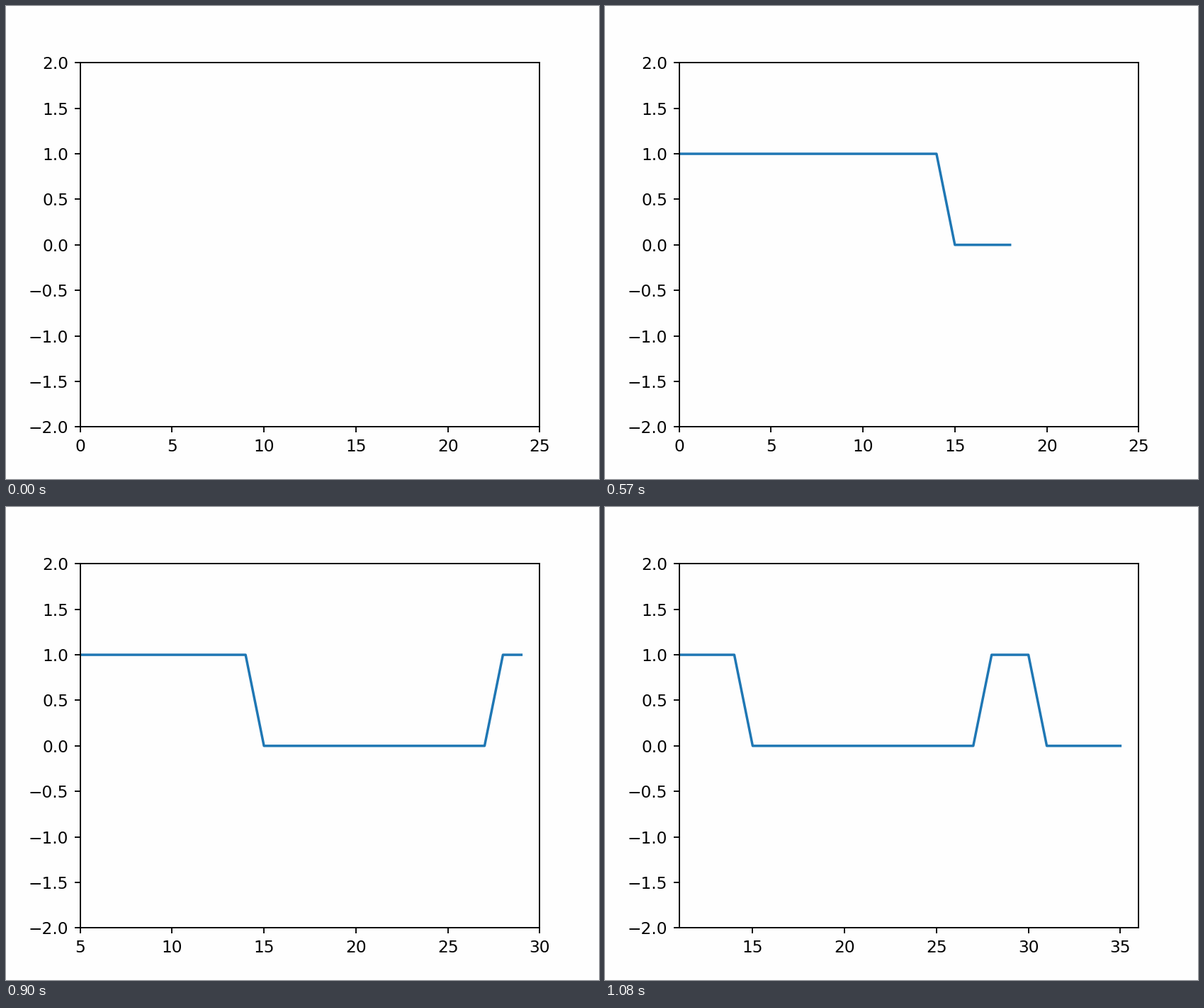
Write a matplotlib script that moves like this. It is 837x669 px and loops after 1110 ms.

```python
import numpy as np
import matplotlib.pyplot as plt
from matplotlib.animation import FuncAnimation
from matplotlib.ticker import MultipleLocator

WIDTH, HEIGHT, DPI = 837, 669, 167.4
FRAMES, INTERVAL = 37, 30
WINDOW = 25
PAPER = "#fefefe"


def signal(x):
    """High until 14, low until 27, then a short pulse from 28 to 30."""
    return np.where((x < 15) | ((x > 27) & (x < 31)), 1, 0)


# The small margin keeps float rounding from dropping a pixel.
fig, ax = plt.subplots(
    figsize=((WIDTH + 0.01) / DPI, (HEIGHT + 0.01) / DPI), dpi=DPI, facecolor=PAPER
)
ax.set_facecolor(PAPER)
ax.set_xlim(0, WINDOW)
ax.set_ylim(-2, 2)
ax.xaxis.set_major_locator(MultipleLocator(5))
ax.yaxis.set_major_locator(MultipleLocator(0.5))
(line,) = ax.plot([], [], color="#1f77b4", lw=1.5)


def update(count):
    start = max(0, count - WINDOW)
    x = np.arange(start, count)
    line.set_data(x, signal(x))
    ax.set_xlim(start, start + WINDOW)
    return (line,)


anim = FuncAnimation(
    fig, update, frames=FRAMES, interval=INTERVAL, repeat=True, repeat_delay=0, blit=False
)
plt.show()
```
